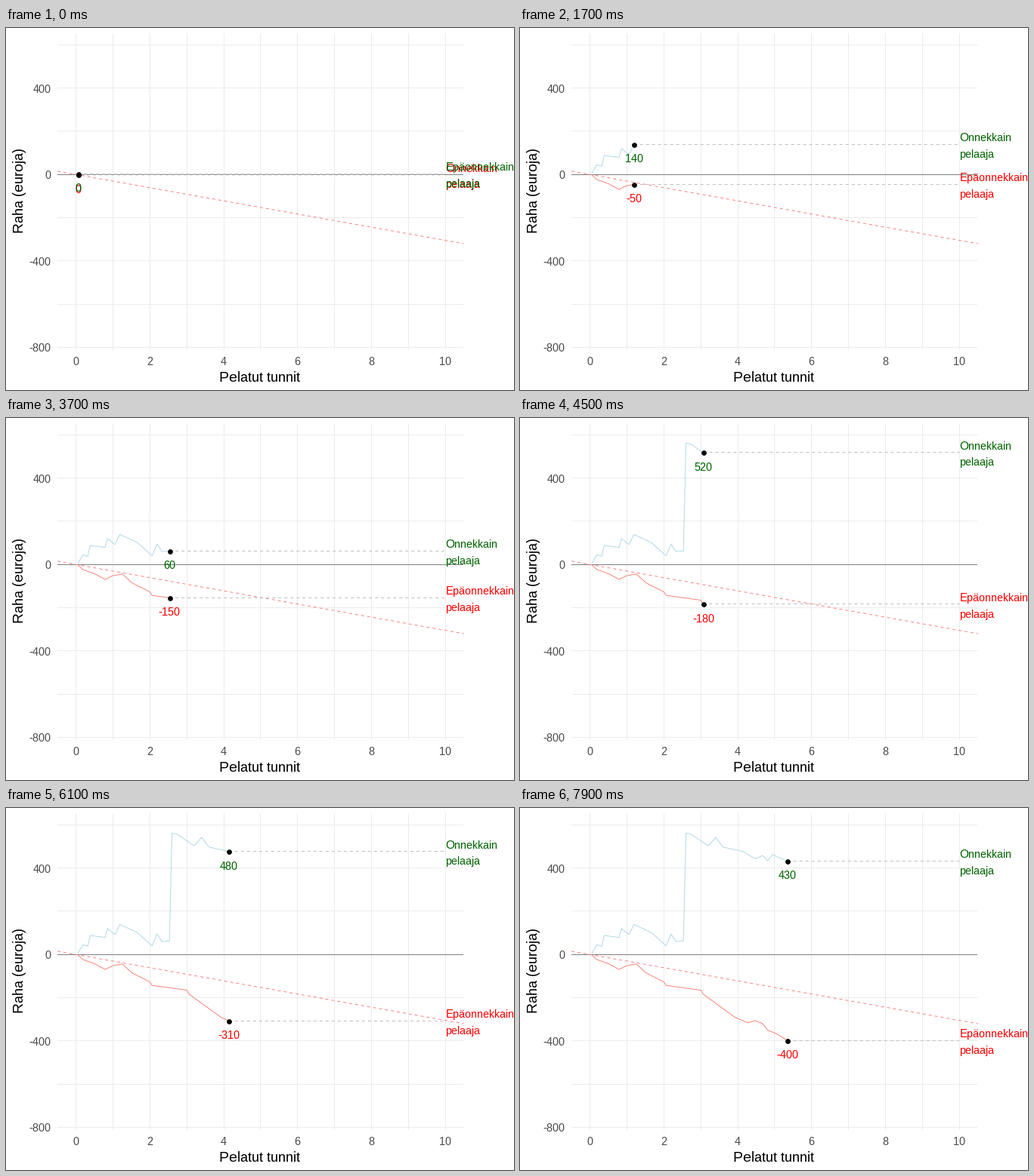
A matplotlib script that plays this animation: 672x480 px, repeating every 8 s.

```python
import matplotlib.pyplot as plt
import numpy as np
from matplotlib.animation import FuncAnimation

W, H, DPI = 672, 480, 100
FRAMES, INTERVAL = 80, 100
PX = 72 / DPI                     # one pixel in points
LEFT, RIGHT, TOP, BOTTOM = 68, 605, 7, 427
GRID, TICK, GREEN = "#EBEBEB", "#4D4D4D", "#006400"
DASH = (0, (4, 4))

# turning points of each balance: (round, euros)
LUCKY = [(0, 4), (2, 45), (4, 38), (5, 88), (11, 79), (12, 120), (15, 92),
         (17, 139), (24, 102), (30, 40), (32, 95), (34, 60), (37, 62),
         (38, 561), (40, 557), (47, 503), (50, 542), (53, 497), (61, 477),
         (66, 443), (69, 458), (71, 434), (73, 462), (79, 432)]
UNLUCKY = [(0, -2), (2, -23), (7, -44), (11, -69), (14, -52), (18, -44),
           (22, -86), (29, -126), (30, -143), (44, -165), (45, -184),
           (58, -292), (63, -316), (66, -306), (69, -320), (71, -350),
           (75, -369), (79, -398)]
ROUNDS = np.arange(FRAMES)
HOURS = 0.05 + 0.067 * ROUNDS

plt.rcParams.update({"font.family": "Liberation Sans",
                     "text.hinting": "native", "text.hinting_factor": 1})


def px(hours):
    return 92.58 + 48.88 * hours


def py(euros):
    return 194.25 - 0.2865 * euros


def mid(v):
    """Centre of the pixel that holds v."""
    return np.floor(v) + 0.5


fig = plt.figure(figsize=(W / DPI, H / DPI), dpi=DPI, facecolor="white")
ax = fig.add_axes([0, 0, 1, 1])
ax.set(xlim=(0, W), ylim=(H, 0))
ax.axis("off")


def line(xs, ys, color, z, width=1, **kw):
    return ax.plot(xs, ys, color=color, lw=width * PX, zorder=z, snap=False,
                   solid_capstyle="butt", dash_capstyle="butt", **kw)[0]


def text(x, y, s, color, z=8, size=15, **kw):
    return ax.text(x, y, s, fontsize=size * PX, color=color, zorder=z,
                   va="baseline", **kw)


def hline(euros, color, z):
    line([LEFT, RIGHT], [mid(py(euros))] * 2, color, z)


# grid, axes and reference lines
for h in range(11):
    line([mid(px(h))] * 2, [TOP, BOTTOM], GRID, 1)
    if h % 2 == 0:
        text(px(h) - 0.5, 447, str(h), TICK, ha="center")
for e in range(-800, 601, 200):
    hline(e, GRID, 1)
    if e % 400 == 0:
        text(59.3, py(e) + 5.9, str(e), TICK, ha="right")
hline(0, "#7F7F7F", 2)
text(335.8, 469, "Pelatut tunnit", "black", size=19, ha="center")
text(22.7, 215.3, "Raha (euroja)", "black", size=19, ha="center",
     rotation=90, rotation_mode="anchor")
ends = np.array([-0.5, 10.5])
line(px(ends), py(-30.5 * ends), "#FF7F7F", 3, linestyle=DASH)


class Player:
    def __init__(self, turns, path_color, text_color, name, z):
        self.euros, self.name = np.interp(ROUNDS, *zip(*turns)), name
        self.path = line([], [], path_color, 4, 0.95)
        self.guide = line([], [], "#BEBEBE", 5, linestyle=DASH)
        self.dot = ax.plot([], [], "o", color="black", ms=6.8 * PX, mew=0,
                           zorder=6, snap=False)[0]
        self.value = text(0, 0, "", text_color, z, ha="center")
        self.title = text(px(10), 0, name, text_color, z)
        self.noun = text(px(10), 0, "pelaaja", text_color, z)

    def show(self, k, name):
        x, y = px(HOURS[k]), py(self.euros[k])
        self.path.set_data(px(HOURS[:k + 1]), py(self.euros[:k + 1]))
        self.guide.set_data([x, px(10)], [mid(y)] * 2)
        self.dot.set_data([mid(x)], [mid(y)])
        self.value.set_text(str(int(round(self.euros[k] / 10)) * 10))
        self.value.set_position((x, y + 24))
        self.title.set_text(name)
        self.title.set_y(y - 4)
        self.noun.set_y(y + 17.6)


unlucky = Player(UNLUCKY, "#FA8072", "red", "Epäonnekkain", 9)
lucky = Player(LUCKY, "lightblue", GREEN, "Onnekkain", 10)


def update(k):
    # the names trade places while the game is still tied
    names = (lucky.name, unlucky.name)
    if k == 0:
        names = names[::-1]
    lucky.show(k, names[0])
    unlucky.show(k, names[1])
    return []


anim = FuncAnimation(fig, update, frames=FRAMES, interval=INTERVAL, repeat=True)
plt.show()
```
